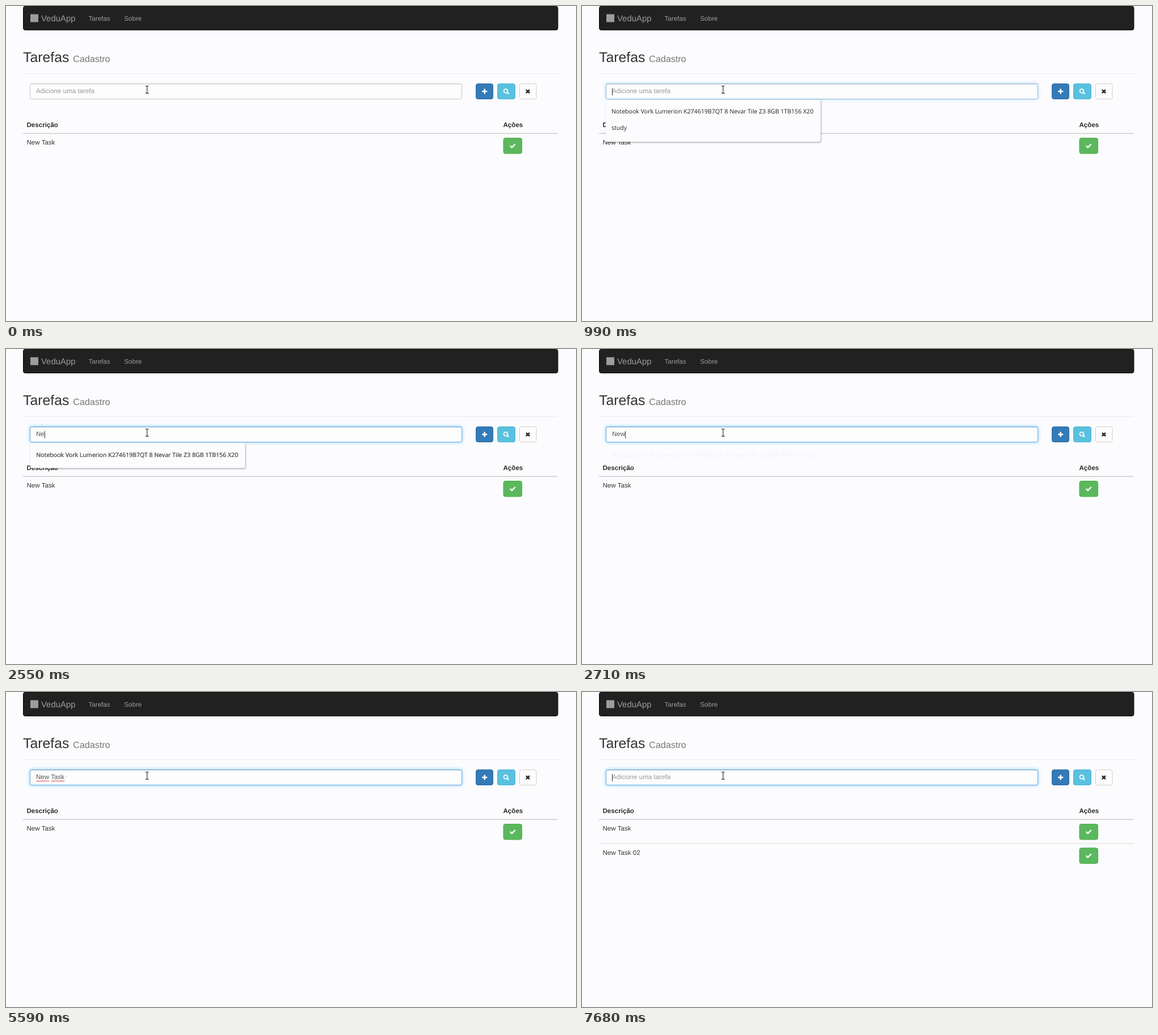
Animation of 1006 by 557 pixels, one loop 8000 ms. Source, as an HTML page:

```html
<!DOCTYPE html>
<html lang="pt-BR">
<head>
<meta charset="utf-8">
<title>Tarefas</title>
<style>
  html, body { margin: 0; width: 100%; height: 100%; overflow: hidden; background: #fcfcfe; }
  body { position: relative; font: 11.6px "Liberation Sans", Arial, sans-serif; text-rendering: geometricPrecision; }
  svg { position: absolute; left: 0; top: 0; }
  text { fill: #333; }
  .nav text { fill: #9d9d9d; }
  .bold { font-weight: bold; fill: #2b2b2b; }
  .icon { fill: none; stroke: #fff; }

  .field, .focus { position: absolute; box-sizing: border-box; left: 42px; top: 137px; width: 763px; height: 28px; border: 1px solid #c6c6c8; border-radius: 3.3px; }
  .field { background: #fdfdfe; box-shadow: inset 0 1px 1px rgba(0,0,0,.075); }
  .focus { border-color: #66afe9; box-shadow: inset 0 1px 1px rgba(0,0,0,.075), 0 0 6.6px rgba(90,185,235,.7); animation: focus 8s linear infinite; }
  .line { position: absolute; left: 53px; top: 137px; height: 28px; line-height: 28px; white-space: pre; color: #555; }
  .hint { color: #999; animation: hint 8s step-end infinite; }
  .typed { display: inline-block; vertical-align: top; overflow: hidden; height: 28px; animation: type 8s step-end infinite; }
  .caret { display: inline-block; vertical-align: top; width: 1px; height: 13px; margin-top: 7.5px; background: #333; animation: blink 8s step-end infinite; }
  .spell1 { animation: spell1 8s step-end infinite; }
  .spell2 { animation: spell2 8s step-end infinite; }
  .added { animation: added 8s step-end infinite; }

  .menu { position: absolute; box-sizing: border-box; left: 42px; top: 166px; width: 378.5px; padding: 6.5px 10px 0; overflow: hidden; background: #fcfcfe; border-radius: 0 0 2px 2px; box-shadow: 1px 1.5px 3px rgba(0,0,0,.32); font: 10.6px/29.5px "Open Sans", "Noto Sans", sans-serif; animation: menu 8s linear infinite; }
  .menu p { margin: 0; overflow: hidden; white-space: pre; }

  @keyframes focus { 0%, 11.19% { opacity: 0 } 11.2% { opacity: .25 } 13.5%, 100% { opacity: 1 } }
  @keyframes hint { 0% { opacity: 1 } 21.6% { opacity: 0 } 82.7%, 100% { opacity: 1 } }
  @keyframes added { 0% { opacity: 0 } 82.7%, 100% { opacity: 1 } }
  @keyframes spell1 { 0% { opacity: 0 } 34.85% { opacity: 1 } 82.7%, 100% { opacity: 0 } }
  @keyframes spell2 { 0% { opacity: 0 } 63.1% { opacity: 1 } 82.7%, 100% { opacity: 0 } }
  @keyframes type {
    0% { width: 0 }
    21.6% { width: .722em }
    31.35% { width: 1.278em }
    33.85% { width: 2em }
    34.85% { width: 2.278em }
    44.1% { width: 2.8em }
    53.95% { width: 3.335em }
    63.1% { width: 4.613em }
    72.35% { width: 5.169em }
    73.45% { width: 5.725em }
    82.7%, 100% { width: 0 }
  }
  @keyframes blink {
    0%, 16.95%, 28.7%, 41.6%, 50.85%, 60.6%, 69.85%, 80.1%, 89.35% { opacity: 0 }
    11.2%, 21.6%, 31.35%, 44.1%, 53.95%, 63.1%, 72.35%, 82.7%, 95.95%, 100% { opacity: 1 }
  }
  @keyframes menu {
    0%, 11.19% { opacity: 0; height: 73.5px; color: #222; transform: none; text-shadow: 0 0 transparent }
    11.2%, 22.1% { opacity: 1; height: 73.5px; color: #222; transform: none; text-shadow: 0 0 transparent }
    22.15%, 31.3% { opacity: 1; height: 44px; color: #222; transform: none; text-shadow: 0 0 transparent }
    31.35%, 31.9% { opacity: 1; height: 44px; color: #555; transform: translate(1px, .5px); text-shadow: .5px 0 #666 }
    33.85% { opacity: .05; height: 44px; color: #555; transform: translate(1px, .5px); text-shadow: .5px 0 #666 }
    35%, 100% { opacity: 0; height: 44px; color: #555; transform: translate(1px, .5px); text-shadow: .5px 0 #666 }
  }
</style>
</head>
<body>
<div class="field"></div>
<div class="focus"></div>

<svg width="1006" height="557" viewBox="0 0 1006 557">
  <defs>
    <pattern id="wave" width="3.4" height="3" patternUnits="userSpaceOnUse" y="156">
      <path d="M0 2.1L1.7 .8L3.4 2.1" fill="none" stroke="#e2494c" stroke-width=".9"/>
    </pattern>
    <g id="done">
      <rect x="878" y="233.5" width="32.5" height="27.5" rx="3.3" fill="#5cb85c" stroke="#4cae4c"/>
      <path class="icon" d="M889.6 247L892.8 250.1L898.8 244" stroke-width="2.4"/>
    </g>
  </defs>

  <g class="nav">
    <rect x="30.5" y=".5" width="943.5" height="42" rx="3.3" fill="#212122" stroke="#0b0b0b"/>
    <rect x="43" y="14.5" width="14" height="14" fill="#9d9d9d"/>
    <text x="62" y="26.7" font-size="14.9">VeduApp</text>
    <text x="145.8" y="25.5">Tarefas</text>
    <text x="208.5" y="25.5">Sobre</text>
  </g>

  <text x="30" y="98.6" font-size="24.85">Tarefas</text>
  <text x="118.3" y="98.6" font-size="16.15" style="fill:#777">Cadastro</text>
  <rect x="30" y="119" width="944" height="1" fill="#ebebec"/>

  <rect x="829.5" y="137.5" width="30" height="27" rx="3.3" fill="#337ab7" stroke="#2e6da4"/>
  <path class="icon" d="M840.2 151H849.2M844.7 146.5V155.5" stroke-width="2.5"/>
  <rect x="867.5" y="137.5" width="31" height="27" rx="3.3" fill="#5bc0de" stroke="#46b8da"/>
  <circle class="icon" cx="882" cy="150.2" r="3.4" stroke-width="1.8"/>
  <path class="icon" d="M884.4 152.6L887.2 155.4" stroke-width="2.2"/>
  <rect x="906.5" y="137.5" width="29.5" height="27" rx="3.3" fill="#fefefe" stroke="#ccc"/>
  <path class="icon" d="M918 148.2L924 154.2M924 148.2L918 154.2" stroke-width="2.4" style="stroke:#222"/>

  <text class="bold" x="36.5" y="213.8">Descrição</text>
  <text class="bold" x="877.5" y="213.8">Ações</text>
  <rect x="30" y="224.7" width="944" height="1.4" fill="#c9c9ca"/>

  <text x="36.5" y="245.2">New Task</text>
  <use href="#done"/>
  <g class="added">
    <rect x="30" y="267.5" width="944" height="1" fill="#dadad6"/>
    <text x="36.5" y="287.5">New Task 02</text>
    <use href="#done" y="42.3"/>
  </g>

  <rect class="spell1" x="53" y="156" width="23.4" height="3" fill="url(#wave)"/>
  <rect class="spell2" x="79.5" y="156" width="24" height="3" fill="url(#wave)"/>
  <path d="M246.2 141.5H248L249 142.3L250 141.5H251.8M249 142.3V153.6M246.2 154.4H248L249 153.6L250 154.4H251.8" fill="none" stroke="#222" stroke-width="1.1"/>
</svg>

<div class="line hint">Adicione uma tarefa</div>
<div class="line"><span class="typed">New Task 02</span><span class="caret"></span></div>

<div class="menu">
  <p>Notebook Vork Lumerion K274619B7QT 8 Nevar Tile Z3 8GB 1TB156 X20 Preto</p>
  <p>study</p>
</div>
</body>
</html>
```
